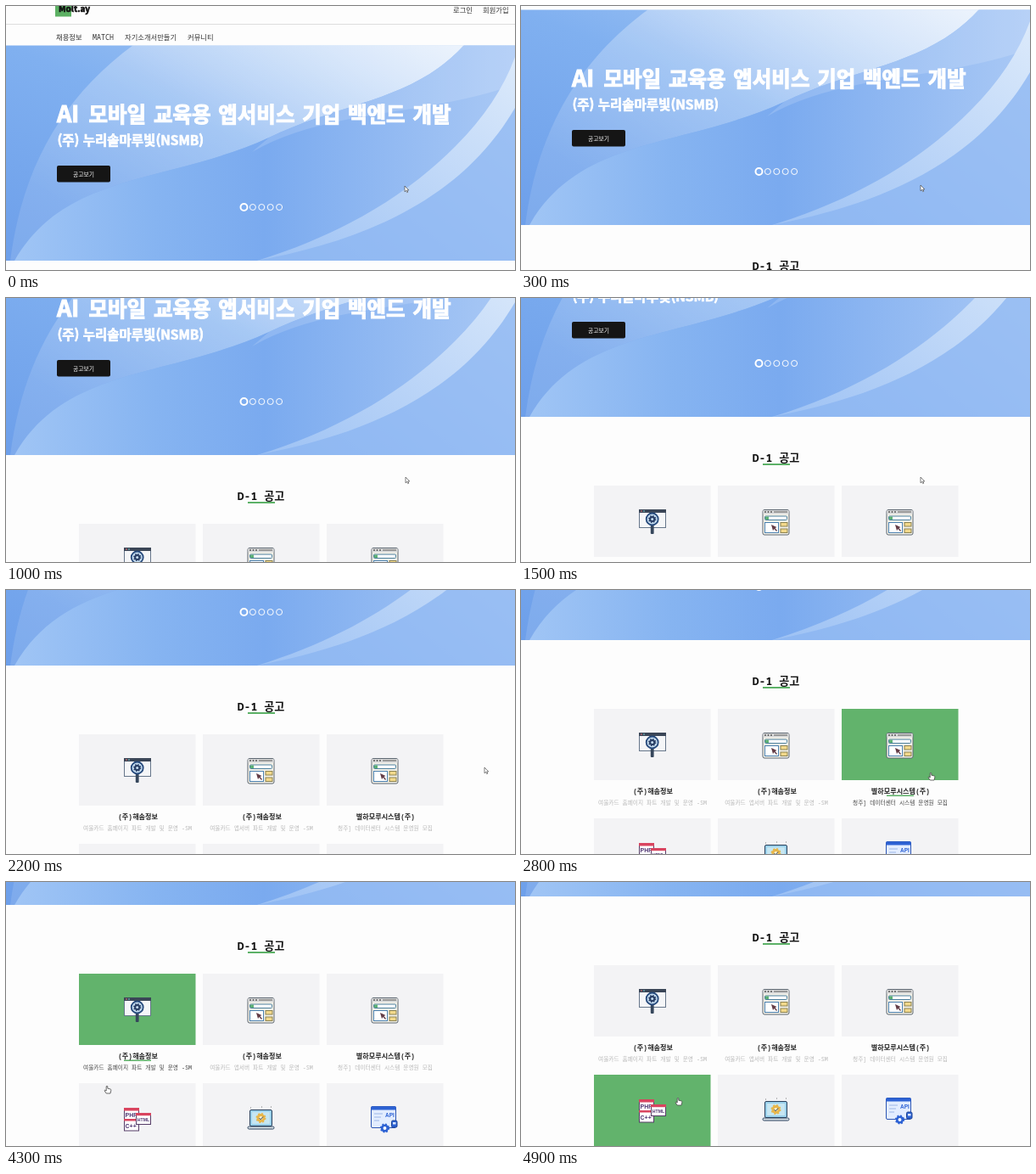
An HTML page for the animation above (5 s loop, 600x311 px).

```html
<!DOCTYPE html>
<html lang="ko">
<head>
<meta charset="utf-8">
<title>채용정보</title>
<style>
  html, body { margin: 0; width: 100%; height: 100%; overflow: hidden; background: #fdfdfd; }
  svg { display: block; width: 100%; height: 100%; }
  text { font: 8.3px 'Noto Sans Mono', 'Noto Sans CJK KR', 'Noto Sans CJK', sans-serif; fill: #333; white-space: pre; }
  .mid { text-anchor: middle; }
  .big, .big tspan { font-family: 'Noto Sans CJK KR', 'Noto Sans CJK', sans-serif; font-weight: 900; fill: #fff; stroke: #fff; stroke-width: 1.1; }
  .name { font-size: 8.1px; font-weight: 700; fill: #222; }
  .job { font-size: 6.67px; fill: #b9b9b9; }
  .box { fill: #f3f3f5; }
  .bar { fill: #5cb167; visibility: hidden; }
  .on .box { fill: #62b36c; }
  .on .job { fill: #444; }
  .on .bar { visibility: visible; }
  .icon text { font-family: 'Liberation Sans', sans-serif; font-weight: 700; }
</style>
</head>
<body>
<svg viewBox="0 0 600 311" preserveAspectRatio="none">
  <defs>
    <linearGradient id="base" x1="0" y1="1" x2="1" y2="0">
      <stop offset="0" stop-color="#6d9fea"/><stop offset=".5" stop-color="#80b0f0"/><stop offset="1" stop-color="#b4d1f6"/>
    </linearGradient>
    <linearGradient id="glow" x1="0" y1=".8" x2="1" y2="0">
      <stop offset=".1" stop-color="#fff" stop-opacity=".06"/><stop offset=".5" stop-color="#fff" stop-opacity=".25"/>
      <stop offset="1" stop-color="#fff" stop-opacity=".75"/>
    </linearGradient>
    <linearGradient id="wave" x1="0" x2="1">
      <stop offset="0" stop-color="#a0c5f5"/><stop offset=".28" stop-color="#86b4f1"/>
      <stop offset=".5" stop-color="#7aaaef"/><stop offset="1" stop-color="#aac9f5"/>
    </linearGradient>
    <linearGradient id="fold" x1="0" y1="1" x2="1" y2="0">
      <stop offset="0" stop-color="#9cc1f4"/><stop offset="1" stop-color="#dceafb"/>
    </linearGradient>
    <clipPath id="frame"><path d="M0 46.5H600V300H0Z"/></clipPath>
  </defs>

  <g id="page">
    <path d="M58-10H77V12.5H58Z" fill="#5cb063"/>
    <text x="62" y="7" class="big" style="font-size:10px;fill:#111;stroke:#111;stroke-width:.6">Molt.ay</text>
    <text x="527" y="8">로그인</text>
    <text x="562" y="8">회원가입</text>
    <path d="M0 21.5H600" stroke="#ddd"/>
    <text x="59" y="40">채용정보</text>
    <text x="102" y="40">MATCH</text>
    <text x="140" y="40">자기소개서만들기</text>
    <text x="214" y="40">커뮤니티</text>

    <g clip-path="url(#frame)">
      <path d="M0 46H600V300H0Z" fill="url(#base)"/>
      <path d="M5 300C20 185 70 105 150 46H600V300Z" fill="#fff" opacity=".06"/>
      <path d="M10 300C70 195 190 210 310 155C400 112 480 112 540 46H150C70 105 20 185 5 300Z" fill="url(#glow)"/>
      <path d="M10 300C70 195 190 210 310 155C400 112 480 112 540 46H600V300Z" fill="url(#wave)"/>
      <path d="M290 172C380 120 500 130 600 92V46H540C480 112 400 112 310 155Z" fill="#fff" opacity=".15"/>
      <path d="M296 300C400 268 475 220 530 165Q580 115 600 60V300Z" fill="url(#fold)"/>
      <path d="M296 300C400 280 530 240 600 120V300Z" fill="#8ab4f2" opacity=".75"/>
    </g>
    <text y="137" class="big" style="font-size:24.5px;word-spacing:1.9px"><tspan x="60" font-size="27">AI</tspan><tspan x="97.5">모바일 교육용 앱서비스 기업 백엔드 개발</tspan></text>
    <text x="60.5" y="164" class="big" style="font-size:15.5px;stroke-width:.7">(주) 누리솔마루빛(NSMB)</text>
    <rect x="60" y="188" width="63" height="19.5" rx="2" fill="#151515"/>
    <text x="91.5" y="200.5" class="mid" style="font-size:6.8px;fill:#fff">공고보기</text>
    <g id="dots" fill="none" stroke="#fff"></g>

    <text x="300.5" y="352.5" class="mid" style="font-size:13.1px;font-weight:700;fill:#111">D-1 공고</text>
    <path d="M285 355H317V357H285Z" fill="#5cb167"/>
    <g id="cards"></g>
  </g>

  <g id="cursor" stroke="#444" stroke-width=".8" stroke-linejoin="round" fill="#fff">
    <path id="arrow" transform="scale(.85)" d="M0 0V8L1.9 6.3L3.2 9L4.5 8.4L3.2 5.8H5.6Z"/>
    <path id="hand" d="M-.8 .8Q0-.6 .8 .8V3.2L4.2 4Q5 4.3 4.8 5.5L4 9H-.8L-3 5.7Q-2.8 4.5-.8 6Z"/>
  </g>
</svg>
<script>
const $ = id => document.getElementById(id);
const rect = (x, y, w, h, fill, stroke = 'none', r = 0) =>
  `<rect x="${x}" y="${y}" width="${w}" height="${h}" rx="${r}" fill="${fill}" stroke="${stroke}"/>`;
const gear = (x, y, r, color, hole) =>
  `<circle cx="${x}" cy="${y}" r="${r}" fill="${color}"/>` +
  `<circle cx="${x}" cy="${y}" r="${r}" fill="none" stroke="${color}" stroke-width="2" stroke-dasharray="${r * .3927}"/>` +
  `<circle cx="${x}" cy="${y}" r="${r * .42}" fill="${hole}"/>`;
const label = (x, y, size, color, s) => `<text x="${x}" y="${y}" style="font-size:${size}px;fill:${color}">${s}</text>`;

// Icons, relative to the card's corner
const search = rect(53.5, 28.5, 31, 21, '#f5f6f8', '#66768a') + rect(53, 28, 32, 4, '#3b4657') +
  rect(55, 29.5, 2, 1, '#e77') + rect(58, 29.5, 2, 1, '#7cc') +
  rect(66.8, 46, 3.8, 11, '#36475c', 'none', 1) +
  '<circle cx="68.7" cy="39.5" r="7" fill="#c4dcf0" stroke="#274a7c" stroke-width="1.8"/>' + gear(68.7, 39.5, 3.6, '#2a3f66', '#c4dcf0');
const browser = rect(53, 28.5, 31, 29.5, '#f3f1e8', '#5c6670', 2) + rect(53.5, 29, 30, 4.5, '#d9dadb') +
  [56, 59.5, 63].map(x => `<circle cx="${x}" cy="31" r="1" fill="#555"/>`).join('') +
  rect(66, 30, 16, 2, '#999') + rect(55.5, 36, 26, 4.5, '#fff', '#4a7f9d', 1) + rect(56, 36.5, 4, 3.5, '#5db075') +
  rect(55.5, 43.5, 16, 12, '#fff', '#4a7fae') +
  rect(74, 43.5, 8, 4.5, '#f3d98b', '#8b8250') + rect(74, 51, 8, 4.5, '#f3d98b', '#8b8250') +
  '<path d="M63 46L65 53L66.5 51L69 54L70 53L67.5 50L69.5 49Z" fill="#633c46"/>';
const code = rect(53.5, 29.5, 17, 26.5, '#fff', '#553c67') + rect(53, 29, 18, 3.5, '#d9445f') +
  rect(53, 42, 18, 2.5, '#d9445f') + label(54.5, 40, 7, '#533a75', 'PHP') + label(54.5, 53, 7, '#533a75', 'C++') +
  rect(67.5, 35.5, 17, 13, '#fff', '#553c67') + rect(67, 35, 18, 3.2, '#d9445f') + label(68.8, 45, 5.2, '#533a75', 'HTML');
const laptop = rect(55.5, 31.5, 26, 19, '#9ad0ea', '#29405c', 1.5) + rect(58, 34, 21, 14, '#c6e6f2') +
  gear(68.5, 41, 5, '#e8b64a', '#fff4d2') + '<path d="M66.5 41L68.2 42.8L71 39.5" fill="none" stroke="#29405c"/>' +
  rect(53, 51, 31, 3, '#dbe3e8', '#29405c', 1.5) +
  '<path d="M56 29h1M80 28h1M69 28h1" stroke="#777"/>';
const api = rect(52.5, 27.5, 29, 25, '#e3edff', '#2d56b4', 1.5) + rect(52.5, 27.5, 29, 4, '#2d62d4') +
  '<path d="M56 36H66M56 40H64M56 44H62" stroke="#9cb6e6"/>' + label(69, 40, 6.5, '#2d62d4', 'API') +
  rect(76.5, 44, 6.5, 8, '#2d62d4', '#1f4390', 1.5) + rect(78, 46, 3.5, 2.5, '#dbe7ff') + gear(68.5, 53, 4.6, '#2d62d4', '#fff');

const cards = [
  [search, '(주)해솜정보', '여울카드 홈페이지 파트 개발 및 운영 -SM'],
  [browser, '(주)해솜정보', '여울카드 앱서버 파트 개발 및 운영 -SM'],
  [browser, '별하모루시스템(주)', '청주] 데이터센터 시스템 운영원 모집'],
  [code], [laptop], [api]
];
$('cards').innerHTML = cards.map(([icon, name = '', job = ''], i) =>
  `<g transform="translate(${86 + i % 3 * 146} ${i < 3 ? 381 : 510})">
    <rect class="box" width="137.5" height="84"/><g class="icon">${icon}</g>
    ${name && '<path class="bar" d="M53 101.5H85V103H53Z"/>'}
    <text class="name mid" x="69.5" y="99.5">${name}</text><text class="job mid" x="69" y="112.5">${job}</text>
  </g>`).join('');
$('dots').innerHTML = [0, 1, 2, 3, 4].map(i =>
  `<circle cx="${280.5 + i * 10.4}" cy="237" r="${i ? 3.5 : 4}" stroke-width="${i ? 1 : 2}"/>`).join('');

// Keys: time, then values
const scroll = [[0, 0], [500, 70], [1500, 160], [2200, 211], [2500, 241], [3600, 241], [4300, 273], [4800, 283]];
const mouse = [[0, 470, 212], [500, 471, 211], [1800, 471, 211], [2200, 564, 209], [2500, 566, 210], [2700, 510, 214],
  [3000, 430, 218], [3200, 360, 222], [3500, 221, 226], [3800, 140, 230], [4300, 119, 240], [4800, 125, 250], [4900, 185, 254]];
const hover = [[0, -1], [2700, 2], [3200, 1], [3600, 0], [4500, 3]];

function at(keys, t) {
  const n = keys.findIndex(k => k[0] > t);
  if (n < 0) return keys[keys.length - 1].slice(1);
  const a = keys[n - 1], b = keys[n], p = (t - a[0]) / (b[0] - a[0]);
  return a.slice(1).map((v, i) => v + (b[i + 1] - v) * p);
}

function draw(now) {
  const t = Math.floor(now % 5000 / 100) * 100;
  const active = hover.filter(h => h[0] <= t).pop()[1];
  $('page').setAttribute('transform', `translate(0 ${-Math.round(at(scroll, t)[0])})`);
  $('cursor').setAttribute('transform', `translate(${at(mouse, t).map(Math.round)})`);
  $('arrow').style.display = active < 0 ? '' : 'none';
  $('hand').style.display = active < 0 ? 'none' : '';
  [...$('cards').children].forEach((c, i) => c.classList.toggle('on', i === active));
}
const start = performance.now();
function tick() {
  draw(performance.now() - start);
  requestAnimationFrame(tick);
}
tick();
</script>
</body>
</html>
```
